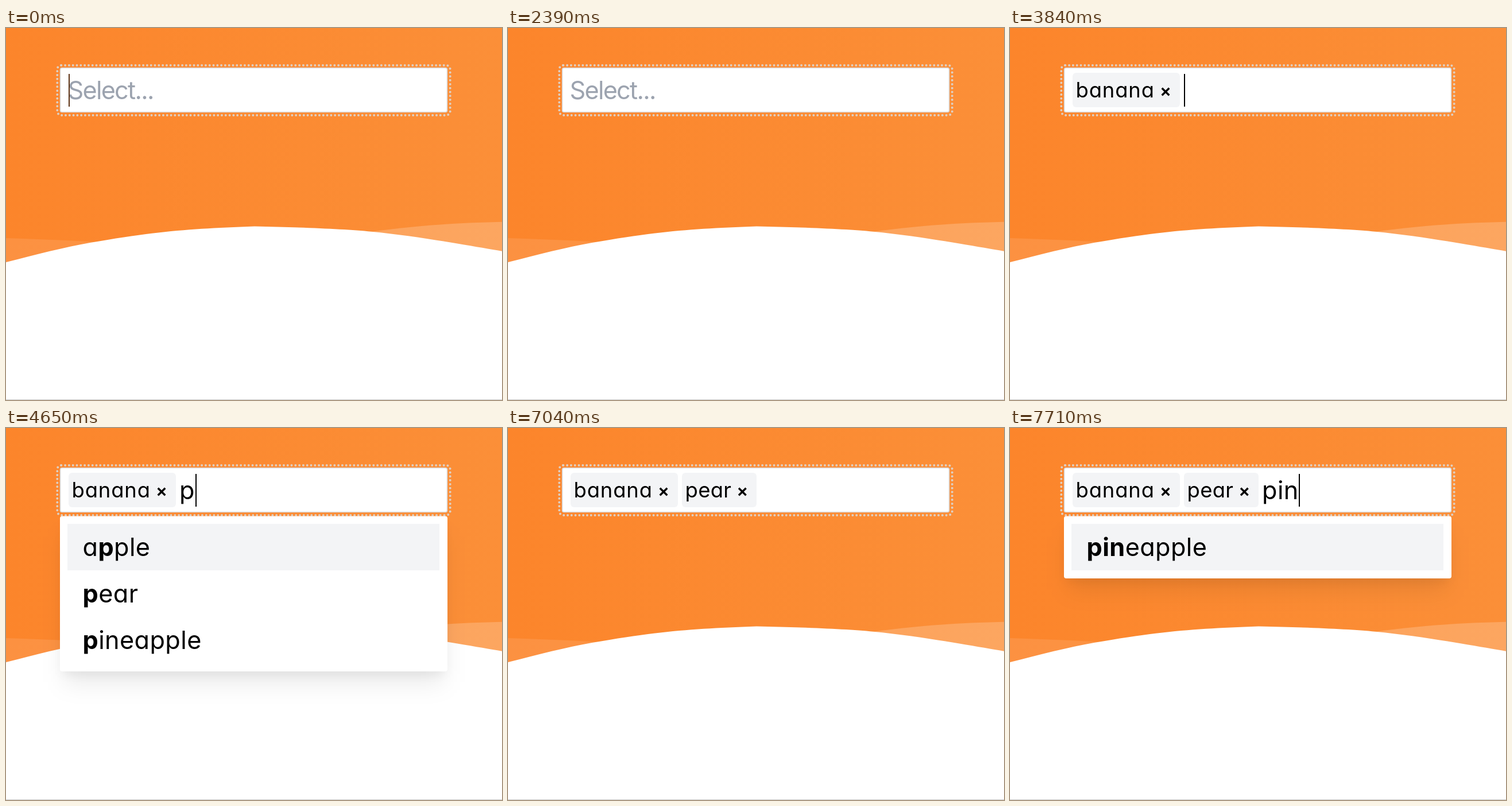
Animation of 864 by 648 pixels, one loop 8 s. Source, as an HTML page:

```html
<!DOCTYPE html>
<html lang="en">
<head>
<meta charset="utf-8">
<title>Multi select</title>
<style>
  html, body { margin: 0; width: 100%; height: 100%; overflow: hidden; background: #fff; }
  svg { display: block; width: 864px; height: 648px; }
  text {
    font-family: Inter, "Open Sans", sans-serif;
    font-size: 43.2px;
    font-feature-settings: "cv11";
    font-optical-sizing: none;
    letter-spacing: .01em;
    white-space: pre;
  }
  .chip text { font-size: 36.4px; }
  .match { font-weight: 700; }
  .soft { fill: #f3f4f6; }
</style>
</head>
<body>
<svg viewBox="0 0 864 648">
  <defs>
    <linearGradient id="sky">
      <stop offset="0" stop-color="#fc852b"/>
      <stop offset="1" stop-color="#fb8f38"/>
    </linearGradient>
    <filter id="wide" filterUnits="userSpaceOnUse" x="0" y="0" width="864" height="800">
      <feGaussianBlur stdDeviation="20"/>
    </filter>
    <filter id="near" filterUnits="userSpaceOnUse" x="0" y="0" width="864" height="800">
      <feGaussianBlur stdDeviation="8"/>
    </filter>
  </defs>

  <rect width="864" height="648" fill="url(#sky)"/>
  <g fill="#fff" transform="translate(-1437.7 344.7) scale(1.85)">
    <path opacity=".1" d="M548 13.6C668 6.6 812.5 9.8 981 23.1V60H548Z"/>
    <path opacity=".2" d="M1048 19.7C1132.8 -2.7 1281 -14.4 1441 8.2V60H1048Z"/>
    <path d="M727.6 46.1C780.5 34.3 818.8 22.5 856.3 15.9C922.7 4.2 955.7 2.5 1011.2 .4
             C1060.7 1.5 1097.4 3.1 1121.2 5.4C1161.7 9.2 1208.6 17.8 1235.4 22.3C1285.9 30.7 1354.4 47.4 1440.9 72.4V180H727.6Z"/>
  </g>
  <rect y="647" width="864" height="1" fill="#c9c9c9"/>

  <rect x="89.3" y="65" width="684.4" height="87" rx="7" fill="none" stroke="#dfcfc1"
        stroke-width="4" stroke-linecap="round" stroke-dasharray="0 6.8"/>
  <rect x="94.5" y="69.5" width="674" height="77" rx="3" fill="#fff" stroke="#d9d7d5" stroke-width="1.6"/>

  <g id="menu">
    <rect id="wideShade" x="102" y="189" width="659" filter="url(#wide)" fill-opacity=".09"/>
    <rect id="nearShade" x="99.4" y="170" width="664.2" filter="url(#near)" fill-opacity=".05"/>
    <rect id="panel" x="94" y="153.5" width="675" rx="4" fill="#fff"/>
    <rect id="mark" class="soft" x="107" width="648" height="81"/>
    <g id="rows"></g>
  </g>
  <g id="chips"></g>
  <text id="input" y="124"></text>
  <rect id="caret" y="80" width="2" height="57"/>
</svg>

<script>
const LOOP = 8000;
const OPTIONS = ["apple", "banana", "pear", "pineapple", "kiwi"];
const TRACKING = { banana: ".024em", kiwi: "-.04em", "Select...": "-.04em" };
const CHIPS = {
  banana: { x: 109, width: 187, cross: 271 },
  pear: { x: 303, width: 130, cross: 408.3 }
};

// Each step changes only the listed parts of the state.
const START = { caret: true, caretX: 109, inputX: 107.5, typed: "", chips: [], open: false, active: 0, ink: "#000" };
const STEPS = [
  [0, { ink: "#5c3214" }],
  [400, { caret: false }],
  [860, { caret: true, ink: "#000" }],
  [1470, { caret: false }],
  [1930, { caret: true }],
  [2390, { caret: false }],
  [2520, { open: true }],
  [2720, { active: 1 }],
  [2920, { caret: true }],
  [3050, { active: 2 }],
  [3310, { active: 1 }],
  [3840, { open: false, chips: ["banana"], caretX: 303, inputX: 302 }],
  [4390, { caret: false }],
  [4650, { open: true, typed: "p", active: 0, caret: true, caretX: 330 }],
  [4920, { caret: false }],
  [5450, { caret: true }],
  [5980, { caret: false }],
  [6050, { active: 1 }],
  [6510, { caret: true }],
  [6580, { open: false, typed: "", chips: ["banana", "pear"], caretX: 440, inputX: 439 }],
  [7040, { caret: false }],
  [7240, { open: true, typed: "p", active: 0, caret: true, caretX: 467 }],
  [7510, { typed: "pi", caretX: 477 }],
  [7570, { caret: false }],
  [7710, { typed: "pin", caret: true, caretX: 503 }]
];

const el = id => document.getElementById(id);
const set = (node, attrs) => {
  for (const key in attrs) node.setAttribute(key, attrs[key]);
};
const label = (word, x, y, html = word) =>
  `<text x="${x}" y="${y}" style="letter-spacing:${TRACKING[word] || ".01em"}">${html}</text>`;

function chip(word) {
  const { x, width, cross } = CHIPS[word];
  return `<g class="chip"><rect class="soft" x="${x}" y="78" width="${width}" height="60" rx="6"/>` +
    label(word, x + 5.5, 121) +
    `<path d="M${cross - 6.3} 104.7l12.6 12.6m0 -12.6l-12.6 12.6" stroke="#000" stroke-width="3.4"/></g>`;
}

function row(word, index, typed) {
  const html = typed ? word.replace(typed, `<tspan class="match">${typed}</tspan>`) : word;
  return label(word, 133.5, 223 + 81 * index, html);
}

function drawMenu({ open, typed, active }) {
  el("menu").style.display = open ? "" : "none";
  if (!open) return;
  const found = OPTIONS.filter(word => word.includes(typed));
  const height = 27 + 81 * found.length;
  set(el("panel"), { height: height + .5 });
  set(el("wideShade"), { height: height - 16 });
  set(el("nearShade"), { height: height - 11 });
  set(el("mark"), { y: 167 + 81 * active });
  el("rows").innerHTML = found.map((word, i) => row(word, i, typed)).join("");
}

function draw(state) {
  const hint = !state.typed && !state.chips.length;
  const input = el("input");
  input.textContent = hint ? "Select..." : state.typed;
  input.style.letterSpacing = TRACKING[input.textContent] || ".01em";
  set(input, { x: state.inputX, fill: hint ? "#9ca3af" : "#000" });
  set(el("caret"), { x: state.caretX, fill: state.ink, opacity: state.caret ? 1 : 0 });
  el("chips").innerHTML = state.chips.map(chip).join("");
  drawMenu(state);
}

let shown = 0;
function render(ms) {
  const past = STEPS.filter(([at]) => at <= ms % LOOP);
  if (past.length === shown) return;
  shown = past.length;
  draw(Object.assign({}, START, ...past.map(step => step[1])));
}

const begin = performance.now();
function tick() {
  render(performance.now() - begin);
  requestAnimationFrame(tick);
}
tick();
</script>
</body>
</html>
```
